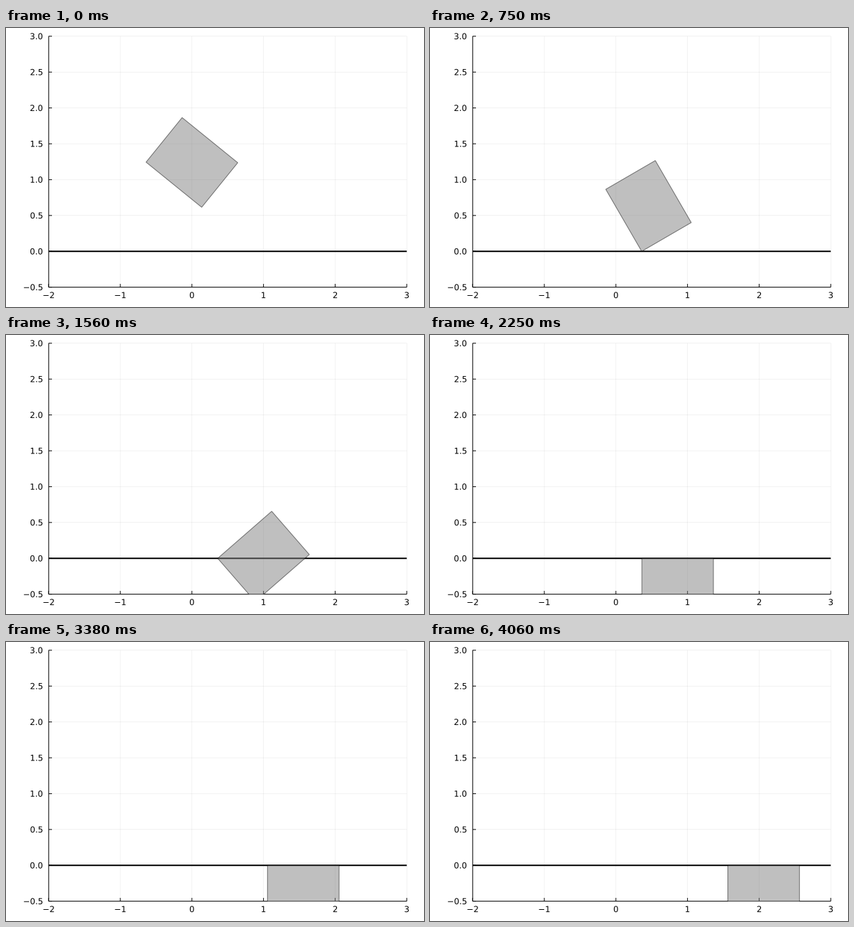
Write a matplotlib script that moves like this. It is 600 px wide and 400 px high and loops after 4.12 s.

```python
import numpy as np
import matplotlib.pyplot as plt
from matplotlib.animation import FuncAnimation
from matplotlib.patches import PathPatch, Polygon
from matplotlib.textpath import TextPath
from matplotlib.transforms import Affine2D

W, H, DPI = 600, 400, 100
LOOP, TICK, STEP = 4120, 20, 62.5  # ms
PX = 72 / DPI                      # one pixel in points
LONG, SHORT = 1.0, 0.8
DIAG = np.degrees(np.arctan2(SHORT, LONG))
HALF = np.hypot(LONG, SHORT) / 2

plt.rcParams["font.family"] = "DejaVu Sans"


def unit(deg):
    a = np.radians(deg)
    return np.array([np.cos(a), np.sin(a)])


def corners(x, y, deg):
    """Box whose long side leaves the pivot corner at angle deg."""
    p, a, b = np.array([x, y]), LONG * unit(deg), SHORT * unit(deg - 90)
    return [p, p + a, p + a + b, p + b]


def fall(s):
    u = s / 7.5
    deg = 141 - 9.4 * u
    centre = np.array([0.286 * u, 1.24 - 0.601 * u * u])
    return (*(centre - HALF * unit(deg - DIAG)), deg)


def skid(s):
    return min(0.36, 0.319 + 0.0145 * s), 0, 131.6 - 3.2 * s - 0.21 * s * s


def tip(s):
    return 0.36, 0, 99 - 6 * s - 0.61 * s * s


def rest(x, deg=0):
    """Lies on the far corner when tilted backwards."""
    return x, max(0, -np.sin(np.radians(deg))), deg


def slide(k):
    knots = [37, 39, 41, 44, 50, 54, 59, 65]
    xs = [0.362, 0.412, 0.480, 0.599, 0.864, 1.055, 1.297, 1.563]
    return np.interp(k, knots, xs), 0, 0


# Each contact event holds the pose for an extra step.
poses = [fall(s) for s in (0, 1, 2, 3, 4, 5, 6, 7, 7.5)]
poses += [skid(s) for s in (0, 1, 2, 3, 4, 4, 5, 6, 7, 7)]
poses += [tip(s) for s in (1, 2, 3, 3, 4, 5, 6, 6)]
poses += [rest(0.357, 23), rest(0.355, 5)] + [rest(0.352)] * 4
poses += [rest(0.341, -0.8)] * 2 + [rest(0.352, -0.35)] + [rest(0.362)] * 2
poses += [slide(k) for k in range(len(poses), 66)]

fig = plt.figure(figsize=(W / DPI, H / DPI), dpi=DPI, facecolor="white")
left, top, bottom = 61.25, 11.81, 371.61
scale = (bottom - top) / 3.5  # pixels per unit
ax = fig.add_axes([left / W, 1 - bottom / H, 5 * scale / W, 3.5 * scale / H])
ax.set(xlim=(-2, 3), ylim=(-0.5, 3))
ax.axis("off")


def line(xs, ys, width, z, alpha=1.0):
    ax.plot(xs, ys, color="black", alpha=alpha, lw=width * PX, zorder=z,
            snap=False, solid_capstyle="butt", clip_on=False)


def label(text, x, y, align):
    """Text with its baseline at pixel y; align is the ink fraction left of x."""
    path = TextPath((0, 0), text.replace("-", "\u2212"), size=11.85)
    ink = path.get_extents()
    shift = Affine2D().translate(x - ink.x0 - align * ink.width, H - y)
    fig.add_artist(PathPatch(path, transform=shift, facecolor="black",
                             lw=0, snap=False))


tick = 4.72 / scale
for x in range(-2, 4):
    line([x, x], [-0.5, 3], 0.5, 0.5, 0.1)
    line([x, x], [-0.5, -0.5 + tick], 1, 1)
    label(f"{x}", left + (x + 2) * scale, bottom + 15.6, 0.5)
for y in np.arange(-0.5, 3.1, 0.5):
    line([-2, 3], [y, y], 0.5, 0.5, 0.1)
    line([-2, -2 + tick], [y, y], 1, 1)
    label(f"{y:.1f}", left - 9, bottom - (y + 0.5) * scale + 4.32, 1)
line([-2, -2], [-0.5, 3], 1, 1)
line([-2, 3], [-0.5, -0.5], 1, 1)
line([-2, 3], [0, 0], 2, 2)

box = Polygon(corners(*poses[0]), closed=True, facecolor=(0.5, 0.5, 0.5, 0.5),
              edgecolor=(0, 0, 0, 0.5), lw=PX, joinstyle="miter",
              snap=False, zorder=3)
ax.add_patch(box)


def update(i):
    k = int(((i + 0.5) * TICK + 2.5) / STEP)
    box.set_xy(corners(*poses[min(k, len(poses) - 1)]))
    return [box]


anim = FuncAnimation(fig, update, frames=LOOP // TICK, interval=TICK,
                     repeat=True, repeat_delay=0, blit=False)
plt.show()
```
